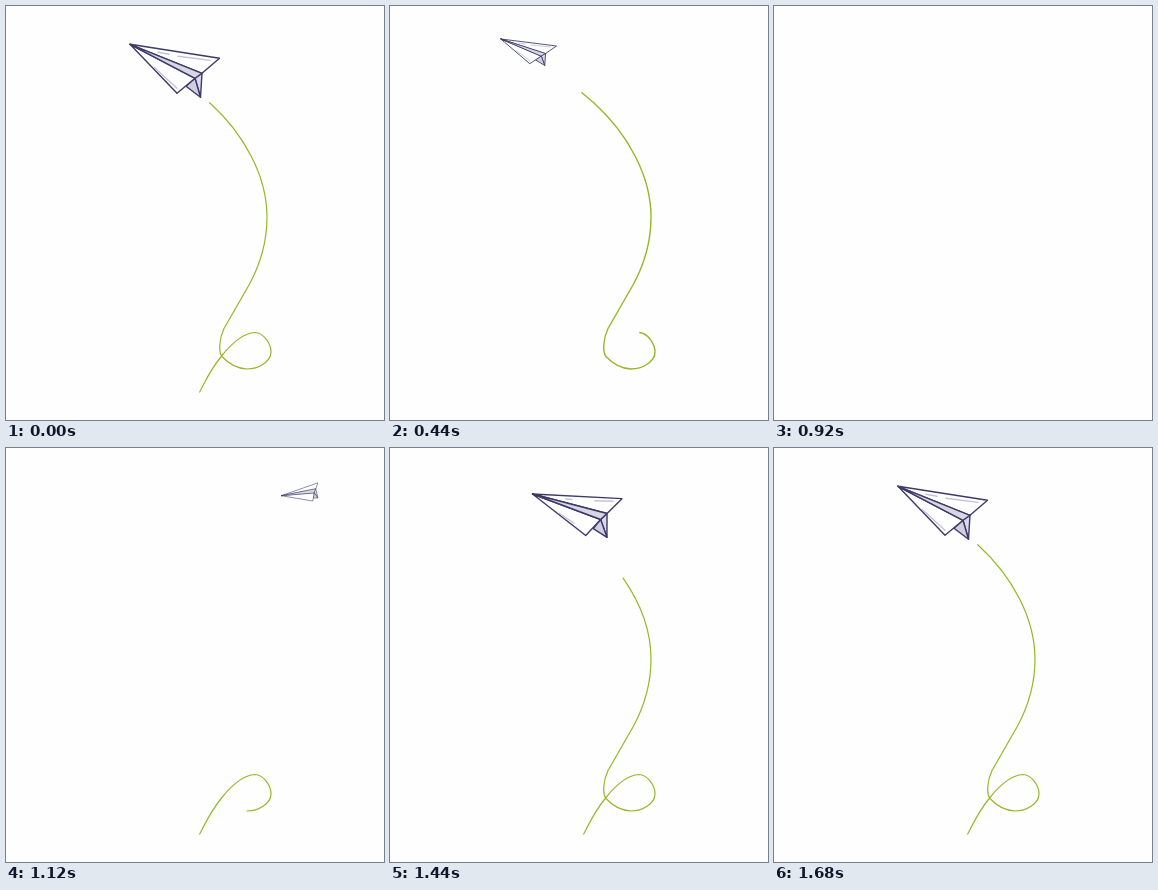
Recreate the animation shown at these times as an HTML page. Size 378 by 414 pixels, loop 2000 ms.

```html
<!DOCTYPE html>
<html lang="en">
<head>
<meta charset="utf-8">
<title>Paper plane</title>
<style>
  html, body { margin: 0; width: 100%; height: 100%; overflow: hidden; background: #fefefe; }
  svg { display: block; width: 100vw; height: 100vh; }
</style>
</head>
<body>
<svg viewBox="0 0 378 414">
  <path id="trail" fill="none" stroke="#97b726" stroke-linecap="round"
    d="M193.7 386C199 376 204 364 216 349.5C226 337 237 327 249 326.5C258 327 265 338 265 346
       C265 356 252 363 241 363C230 362.5 221 356 216 350.5C212.5 346 213 333 218 322.5L243 279
       C254 259 261 235 261 211C261 170 238 128 204 97C200 93.5 196 90 192 86.7
       C170 68 150 55 124 38L91.5 18.5"/>
  <g id="plane" stroke="#3d3a68" stroke-linejoin="round" stroke-linecap="round">
    <path id="keelSide" fill="#d9d9e7"/>
    <path id="keelFront" fill="#cfcfe0"/>
    <path id="leftWing" fill="#fff"/>
    <path id="rightWing" fill="#fff"/>
    <path id="band" fill="#d6d6e5"/>
    <path id="streaks" fill="none" stroke="#c3c2da"/>
  </g>
</svg>
<script>
const LOOP = 2000, STEP = 40;
const el = id => document.getElementById(id);
const trail = el('trail'), plane = el('plane');
const total = trail.getTotalLength();

// Corners relative to the nose: resting pose and banked pose
const REST = { N: [0, 0], T: [89.5, 14], W: [72, 29], B: [70.5, 53], C: [47, 49], K: [65, 34], F: [56, 42] };
const BANK = { N: [0, 0], T: [89.5, -25], W: [82.5, -10.5], B: [87, 12.6], C: [73, 17.5], K: [78, -1.4], F: [76, 11] };
const FACES = { keelSide: 'WBK', keelFront: 'KBF', leftWing: 'NKC', rightWing: 'NTW', band: 'NWK' };

// Streaks as weights of two corners; `grow` is the end that extends
const STREAKS = [
  { on: 'TW', from: [.149, .204], to: [.259, .22], grow: 'from' },
  { on: 'TW', from: [.333, .253], to: [.736, .197], grow: 'from' },
  { on: 'KC', from: [.06, .428], to: [.148, .795], grow: 'to' }
];

const lerp = (a, b, k) => a + (b - a) * k;
const mix2 = (p, q, k) => [lerp(p[0], q[0], k), lerp(p[1], q[1], k)];

// Monotone cubic through [time, value] keys, at rest at both ends
function track(...keys) {
  const n = keys.length - 1;
  const rate = i => (keys[i + 1][1] - keys[i][1]) / (keys[i + 1][0] - keys[i][0]);
  const slope = keys.map((_, i) => {
    if (i === 0 || i === n) return 0;
    const a = rate(i - 1), b = rate(i);
    return a * b > 0 ? 2 * a * b / (a + b) : 0;
  });
  return t => {
    if (t <= keys[0][0]) return keys[0][1];
    if (t >= keys[n][0]) return keys[n][1];
    let i = 0;
    while (t >= keys[i + 1][0]) i++;
    const [t0, v0] = keys[i], [t1, v1] = keys[i + 1];
    const h = t1 - t0, u = (t - t0) / h, w = 1 - u;
    return v0 * w * w * (1 + 2 * u) + v1 * u * u * (3 - 2 * u)
      + h * u * w * (slope[i] * w - slope[i + 1] * u);
  };
}

// Trail length at height y, above the loop
function lengthAt(y) {
  let lo = total * .35, hi = total;
  for (let i = 0; i < 24; i++) {
    const mid = (lo + hi) / 2;
    if (trail.getPointAtLength(mid).y > y) lo = mid; else hi = mid;
  }
  return lo;
}

const restLength = lengthAt(97);
const leave = {
  x: track([240, 124], [440, 111], [600, 98], [840, 91.5]),
  y: track([240, 38.3], [440, 33], [600, 24.7], [840, 18.5]),
  sx: track([240, 1], [440, .62], [600, .21], [840, 0]),
  sy: track([240, 1], [440, .5], [600, .13], [840, 0]),
  bank: () => 0,
  streak: () => 1,
  tail: track([240, 0], [440, 84.5], [600, lengthAt(57)], [840, total]),
  head: track([240, restLength], [440, lengthAt(86.7)], [600, lengthAt(38.3)], [840, total]),
  width: track([240, 1.2], [440, 1.4], [600, 1.7], [840, 1.7])
};
const grow = track([920, 0], [1240, .715], [1440, 1], [1680, 1]);
const arrive = {
  x: track([920, 354], [1240, 212.3], [1440, 142.5], [1680, 124]),
  y: track([920, 14], [1240, 63.2], [1440, 46], [1680, 38.3]),
  sx: grow,
  sy: grow,
  bank: track([920, 1.3], [1240, 1], [1440, .24], [1680, 0]),
  streak: track([1360, 0], [1440, .57], [1680, 1]),
  tail: () => 0,
  head: track([920, 0], [1240, lengthAt(271.5)], [1360, lengthAt(194)], [1440, lengthAt(130.5)], [1680, restLength]),
  width: () => 1.2
};

function drawTrail(tail, head, width) {
  const seen = head - tail;
  trail.style.display = seen > .1 ? '' : 'none';
  trail.setAttribute('stroke-width', width);
  trail.setAttribute('stroke-dasharray', `0 ${tail} ${Math.max(seen, 0)} ${total * 2}`);
  // A leading zero dash would leave a round dot at the start
  trail.setAttribute('stroke-linecap', tail > 0 ? 'butt' : 'round');
}

function drawPlane(x, y, sx, sy, bank, streak) {
  plane.style.display = sx > .002 ? '' : 'none';
  const at = {};
  for (const k in REST) {
    const [px, py] = mix2(REST[k], BANK[k], bank);
    at[k] = [px * sx, py * sy];
  }
  const put = p => (x + p[0]).toFixed(2) + ' ' + (y + p[1]).toFixed(2);
  for (const id in FACES) {
    el(id).setAttribute('d', 'M' + [...FACES[id]].map(k => put(at[k])).join('L') + 'Z');
  }
  let d = '';
  if (streak > 0) for (const s of STREAKS) {
    const [p, q] = [...s.on].map(k => at[k]);
    const spot = w => [p[0] * w[0] + q[0] * w[1], p[1] * w[0] + q[1] * w[1]];
    let a = spot(s.from), b = spot(s.to);
    if (s.grow === 'from') a = mix2(b, a, streak); else b = mix2(a, b, streak);
    d += `M${put(a)}L${put(b)}`;
  }
  el('streaks').setAttribute('d', d);
  plane.setAttribute('stroke-width', 1.4 * sx);
}

function render(now) {
  const t = Math.floor((now % LOOP) / STEP) * STEP;
  const m = t < 880 ? leave : arrive;
  drawTrail(m.tail(t), m.head(t), m.width(t));
  drawPlane(m.x(t), m.y(t), m.sx(t), m.sy(t), m.bank(t), m.streak(t));
}

const start = performance.now();
function tick() {
  render(performance.now() - start);
  requestAnimationFrame(tick);
}
tick();
</script>
</body>
</html>
```
